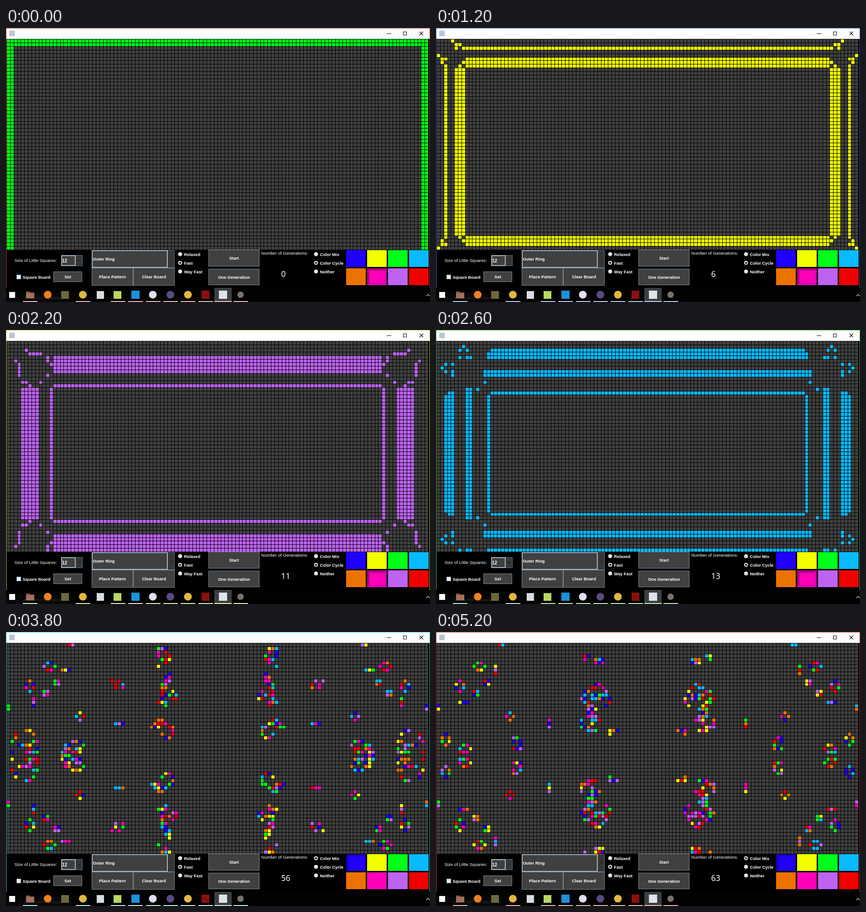
Write an HTML page with a canvas that moves like this. It is 930 px wide and 602 px high and loops after 5400 ms.

```html
<!DOCTYPE html>
<html lang="en">
<head>
<meta charset="utf-8">
<title>Cell automaton</title>
<style>
html, body { margin: 0; width: 100%; height: 100%; overflow: hidden; background: #000; }
canvas { display: block; width: 930px; height: 602px; }
</style>
</head>
<body>
<canvas id="stage" width="930" height="602"></canvas>
<script>
const ctx = document.getElementById('stage').getContext('2d');

const COLS = 118, ROWS = 63, SHOWN = 59, PITCH = 7.84;
const STEP = 200, LOOP = 5400, LAST_GEN = 63;
const C = {
  blue: '#2000ff', yellow: '#f2ff00', green: '#00ff1a', sky: '#08baff',
  orange: '#ec7200', pink: '#ff00b8', purple: '#bd63f2', red: '#f00000'
};
const CYCLE = ['green', 'orange', 'pink', 'purple', 'red', 'sky', 'yellow', 'blue'];
const SWATCHES = ['blue', 'yellow', 'green', 'sky', 'orange', 'pink', 'purple', 'red'];
const SANS = '"Liberation Sans", Arial, sans-serif';

// Life on a torus, seeded with a ring two cells thick
function firstBoard() {
  const b = new Uint8Array(COLS * ROWS);
  for (let r = 0; r < ROWS; r++)
    for (let c = 0; c < COLS; c++)
      b[r * COLS + c] = +(r < 2 || c < 2 || r >= ROWS - 2 || c >= COLS - 2);
  return b;
}

function nextBoard(b) {
  const n = new Uint8Array(b.length);
  for (let r = 0; r < ROWS; r++) {
    for (let c = 0; c < COLS; c++) {
      let sum = 0;
      for (let dr = -1; dr <= 1; dr++)
        for (let dc = -1; dc <= 1; dc++)
          if (dr || dc) sum += b[(r + dr + ROWS) % ROWS * COLS + (c + dc + COLS) % COLS];
      n[r * COLS + c] = +(sum === 3 || (sum === 2 && b[r * COLS + c]));
    }
  }
  return n;
}

const boards = [firstBoard()];
while (boards.length <= LAST_GEN) boards.push(nextBoard(boards[boards.length - 1]));

function randomizer(seed) {
  let s = seed * 2654435761 >>> 0;
  return () => {
    s = s + 0x6d2b79f5 >>> 0;
    let t = Math.imul(s ^ s >>> 15, s | 1);
    t ^= t + Math.imul(t ^ t >>> 7, t | 61);
    return ((t ^ t >>> 14) >>> 0) / 4294967296;
  };
}

// Window accent: hue over time
const HUES = [[0, 0], [800, 80], [1600, 360], [2200, 420], [3000, 530], [3800, 540], [4800, 720], [5400, 720]];
function hueAt(t) {
  const i = Math.max(1, HUES.findIndex(k => k[0] >= t));
  const [t0, h0] = HUES[i - 1], [t1, h1] = HUES[i];
  return (h0 + (h1 - h0) * (t - t0) / (t1 - t0)) % 360;
}

function rect(x, y, w, h, fill) {
  ctx.fillStyle = fill;
  ctx.fillRect(x, y, w, h);
}

function box(x, y, w, h, fill, edge) {
  rect(x, y, w, h, edge);
  rect(x + 1, y + 1, w - 2, h - 2, fill);
}

function disc(x, y, r, fill) {
  ctx.fillStyle = fill;
  ctx.beginPath();
  ctx.arc(x, y, r, 0, Math.PI * 2);
  ctx.fill();
}

function poly(points, fill) {
  ctx.fillStyle = fill;
  ctx.beginPath();
  points.forEach(p => ctx.lineTo(p[0], p[1]));
  ctx.fill();
}

function stroke(points, color, width) {
  ctx.strokeStyle = color;
  ctx.lineWidth = width;
  ctx.beginPath();
  points.forEach((p, i) => i ? ctx.lineTo(p[0], p[1]) : ctx.moveTo(p[0], p[1]));
  ctx.stroke();
}

function label(str, x, y, font, align = 'left', fill = '#fff') {
  ctx.font = font;
  ctx.textAlign = align;
  ctx.fillStyle = fill;
  ctx.fillText(str, x, y);
}

const BOLD = 'bold 9.3px ' + SANS, PLAIN = '9.6px ' + SANS;

function button(str, x, y, w, h) {
  box(x, y, w, h, '#404040', '#7a8a99');
  label(str, x + w / 2, y + h / 2 + 3.5, BOLD, 'center');
}

function combo(str, x, y, w, h, split) {
  box(x, y, w, h, '#363636', '#66727e');
  box(x, y, split, h, '#404040', '#8fa3b7');
  ctx.strokeStyle = '#b3c9de';
  ctx.lineWidth = 1;
  ctx.strokeRect(x + 1.5, y + 1.5, split - 3, h - 3);
  const ax = (x + split + x + w) / 2, ay = y + h / 2;
  poly([[ax - 3, ay - 1], [ax + 3, ay - 1], [ax, ay + 2]], '#222');
}

function radio(str, x, y, on) {
  const g = ctx.createLinearGradient(0, y - 5, 0, y + 5);
  g.addColorStop(0, '#ffffff');
  g.addColorStop(1, '#b8cfe5');
  disc(x, y, 4.6, '#7a8a99');
  disc(x, y, 4, g);
  if (on) disc(x, y, 2.3, '#222');
  label(str, x + 8.5, y + 4, BOLD);
}

function swatch(i, picked) {
  const x = 746 + i % 4 * 46.1 | 0, y = i < 4 ? 488 : 528, w = 43, h = 37, d = 5;
  rect(x, y, w, h, C[SWATCHES[i]]);
  if (!picked) return;
  const [dark, light] = SWATCHES[i] === 'pink' ? ['#b00080', '#e000b4'] : ['#1600b4', '#2000e8'];
  const X = x + w, Y = y + h;
  poly([[x, Y], [x, y], [X, y], [X - d, y + d], [x + d, y + d], [x + d, Y - d]], dark);
  poly([[X, y], [X, Y], [x, Y], [x + d, Y - d], [X - d, Y - d], [X - d, y + d]], light);
}

function drawTitleBar() {
  rect(0, 0, 930, 25, '#fff');
  rect(7, 6, 12, 12, '#b9c6d2');
  rect(835, 12, 10, 1, '#000');
  ctx.strokeStyle = '#000';
  ctx.lineWidth = 1;
  ctx.strokeRect(871.5, 8.5, 7, 7);
  stroke([[907, 8], [915, 16]], '#000', 1.1);
  stroke([[915, 8], [907, 16]], '#000', 1.1);
}

const lineX = c => Math.round(1 + c * PITCH);
const lineY = r => Math.round(24.3 + r * PITCH);

function drawBoard(gen, mixed) {
  const board = boards[gen], rnd = randomizer(gen + 7);
  rect(1, 24, 928, 463, '#000');
  for (let r = 0; r < SHOWN; r++) {
    for (let c = 0; c < COLS; c++) {
      let fill = '#404040';
      if (board[r * COLS + c])
        fill = C[mixed ? SWATCHES[rnd() * 8 | 0] : CYCLE[gen % 8]];
      const x = lineX(c) + 1, y = lineY(r) + 1;
      rect(x, y, lineX(c + 1) - x, lineY(r + 1) - y, fill);
    }
  }
}

function drawPanel(gen, mixed) {
  label('Size of Little Squares:', 18.5, 514, PLAIN);
  combo('12', 121, 499, 47, 24, 32);
  label('12', 123, 515, 'bold 10px ' + SANS);
  box(23, 542, 10, 10, '#e4edf6', '#8a9aaa');
  label('Square Board', 36.5, 550.5, BOLD);
  button('Set', 104, 535, 63, 23);

  combo('Outer Ring', 188, 488, 182, 39, 167);
  label('Outer Ring', 190.5, 510.5, BOLD);
  button('Place Pattern', 188, 527, 91, 39);
  button('Clear Board', 279, 527, 91, 39);

  ['Relaxed', 'Fast', 'Way Fast'].forEach((s, i) => radio(s, 382, 497 + i * 19, i === 1));
  button('Start', 444, 487, 112, 37);
  button('One Generation', 444, 529, 112, 36);

  label('Number of Generations:', 560, 498, PLAIN);
  label(gen, 603.5, 547, '500 17.5px "Noto Sans", "Open Sans", sans-serif');

  ['Color Mix', 'Color Cycle', 'Neither'].forEach((s, i) =>
    radio(s, 680, 497 + i * 19, i === (mixed ? 0 : 1)));
  SWATCHES.forEach((s, i) => swatch(i, s === (mixed ? 'blue' : 'pink')));
}

function drawTaskbar(accent) {
  rect(0, 571, 930, 31, '#020202');
  rect(0, 582, 145, 20, '#080808');
  label('Instructions please', 40, 596, PLAIN, 'left', '#2c2c2c');
  rect(457, 571, 38, 31, '#3c3f40');

  rect(7, 580, 13, 13, '#fff');
  poly([[44, 579], [51, 579], [53, 581], [62, 581], [62, 594], [44, 594]], '#8c5a4c');
  rect(44, 583, 18, 11, '#a4705e');
  disc(91.5, 586, 8.5, '#f08020');
  rect(121, 578, 17, 17, '#6b6a3c');
  disc(168.5, 586, 8.5, '#e0b840');
  rect(199, 578, 16, 17, '#d8dde2');
  rect(236, 578, 17, 17, '#b8d860');
  rect(275, 577, 18, 18, '#1c90d8');
  disc(322, 586, 8.5, '#e4dcf0');
  disc(360.5, 586, 8.5, '#5a4a80');
  disc(399, 586, 8.5, '#e0b840');
  rect(429, 577, 17, 18, '#8c1010');
  rect(467, 577, 18, 18, '#dfe4e8');
  disc(514.5, 586, 7, '#77736a');
  stroke([[922, 589], [926, 585], [930, 589]], '#ddd', 1.2);

  [37, 153, 230, 268, 307, 345, 383, 422, 499].forEach(x => rect(x, 600, 32, 2, accent));
  rect(457, 600, 38, 2, accent);
}

function draw(frame) {
  const gen = frame < 18 ? frame : frame + 37;
  const mixed = gen > 50, hue = hueAt(frame * STEP);
  const edge = `hsl(${hue}, 62%, 52%)`;
  rect(0, 0, 930, 602, '#000');
  drawTitleBar();
  drawBoard(gen, mixed);
  drawPanel(gen, mixed);
  rect(0, 0, 930, 1, edge);
  rect(0, 0, 1, 571, edge);
  rect(929, 0, 1, 571, edge);
  drawTaskbar(`hsl(${hue}, 65%, 84%)`);
}

let start = null, shown = -1;
function tick(now) {
  if (start === null) start = now;
  const frame = Math.floor((now - start) % LOOP / STEP);
  if (frame !== shown) draw(shown = frame);
  requestAnimationFrame(tick);
}
requestAnimationFrame(tick);
</script>
</body>
</html>
```
